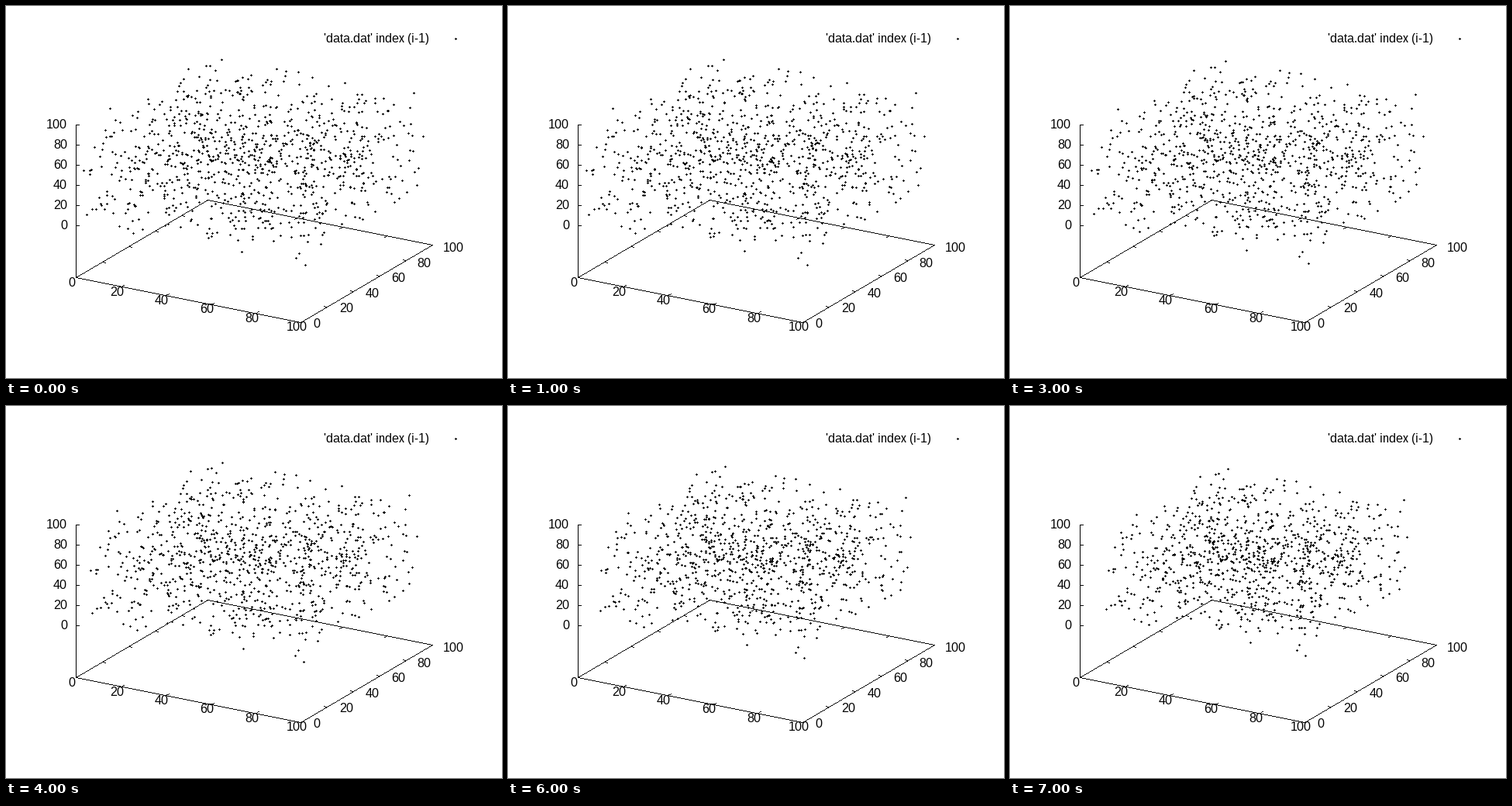
Write a matplotlib script that moves like this. It is 640 px wide and 480 px high and loops after 8000 ms.

```python
import numpy as np
import matplotlib.pyplot as plt
from matplotlib.animation import FuncAnimation
from matplotlib.collections import PolyCollection

plt.rcParams.update({"text.hinting": "default", "text.hinting_factor": 1,
                     "font.family": "Liberation Sans"})

W, H, DPI = 640, 480, 100
FRAMES, STEP_MS = 8, 1000
COUNT = 1000

# Screen shift of each data axis over half its range, and the cube's centre.
AXES = np.array([[145, 29], [85, -50], [0, -65]], float)
CENTRE = np.array([320, 197])
ORIGIN = np.array([90, 350])
PULL, CORNER = 0.00265, 0.0614

# A few outermost particles, in screen pixels; the rest are random.
EXTREMES = [(100, 212), (104, 269), (164, 293), (386, 334), (530, 231),
            (538, 168), (526, 112), (437, 99), (349, 81), (278, 69),
            (229, 94), (134, 132)]

SQUARE = np.array([(-1, -1), (1, -1), (1, 1), (-1, 1)]) / 2
PLUS = np.array([(-1, -3), (1, -3), (1, -1), (3, -1), (3, 1), (1, 1),
                 (1, 3), (-1, 3), (-1, 1), (-3, 1), (-3, -1), (-1, -1)]) / 2


def cross(a, b):
    return a[..., 0] * b[1] - a[..., 1] * b[0]


def edge_share(p):
    """How near each offset is to the cube's outline: 0 centre, 1 edge."""
    shares = [abs(cross(p, e)) / abs(cross(AXES, e)).sum() for e in AXES]
    return np.max(shares, axis=0)


def make_particles():
    rim = (np.array(EXTREMES) - CENTRE) @ np.linalg.pinv(AXES)
    rng = np.random.default_rng(12)
    cloud = rng.uniform(-1, 1, (2 * COUNT, 3))
    cloud = cloud[edge_share(cloud @ AXES) < 0.94]
    return np.vstack([rim, cloud[:COUNT - len(rim)]])


START = make_particles()
SQ = START ** 2
# Gravity inside a uniform cube: linear, and weaker toward the corners.
FIELD = PULL * START * (1 + CORNER * (10 * SQ - 6 * SQ.sum(1, keepdims=True)))


def stamp(points, shape):
    """Copies of a shape centred on the nearest whole pixels."""
    return np.rint(points)[:, None, :] + 0.5 + shape


fig = plt.figure(figsize=(W / DPI, H / DPI), dpi=DPI, facecolor="white")
ax = fig.add_axes([0, 0, 1, 1])
ax.set(xlim=(0, W), ylim=(H, 0))
ax.axis("off")


def add_shapes(verts):
    shapes = PolyCollection(verts, facecolor="black", edgecolor="none")
    return ax.add_collection(shapes)


def line(a, b):
    """A one-pixel line without smoothing."""
    a, b = np.rint(a), np.rint(b)
    steps = int(abs(b - a).max()) + 1
    add_shapes(stamp(np.linspace(a, b, steps), SQUARE))


def label(x, y, text, ha="center"):
    ax.text(x, y, text, ha=ha, va="baseline", fontsize=16 * 72 / DPI)


ex, ey = 2 * AXES[0], 2 * AXES[1]
for start, side in [(0, ex), (ex, ey), (ey, ex), (0, ey)]:
    line(ORIGIN + start, ORIGIN + start + side)
line(ORIGIN, np.array([90, 153]))

tick_x, tick_y, tick_z = np.array([[4, -2], [4, 1], [4, 0]])
for i in range(6):
    name = str(20 * i)
    on_x, on_y = ORIGIN + ex * i / 5, ORIGIN + ey * i / 5
    on_z = np.array([90, 283 - 26 * i])
    line(on_x, on_x + tick_x)
    line(on_x + ey, on_x + ey - tick_x)
    line(on_y, on_y + tick_y)
    line(on_y + ex, on_y + ex - tick_y)
    line(on_z, on_z + tick_z)
    label(85.3 + 57.9 * i, 362.3 + 11.3 * i, name)
    label(396.5 + 33.5 * i, 415 - 19.6 * i, name, "left")
    label(79, on_z[1] + 5, name, "right")

label(545.5, 47, "'data.dat' index (i-1)", "right")
add_shapes(stamp(np.array([[580, 42]]), PLUS))
dots = add_shapes([])


def draw(n):
    points = (START - FIELD * n ** 2) @ AXES + CENTRE
    dots.set_verts(stamp(points, PLUS))
    return [dots]


anim = FuncAnimation(fig, draw, frames=FRAMES, interval=STEP_MS,
                     repeat=True, repeat_delay=0)
plt.show()
```
